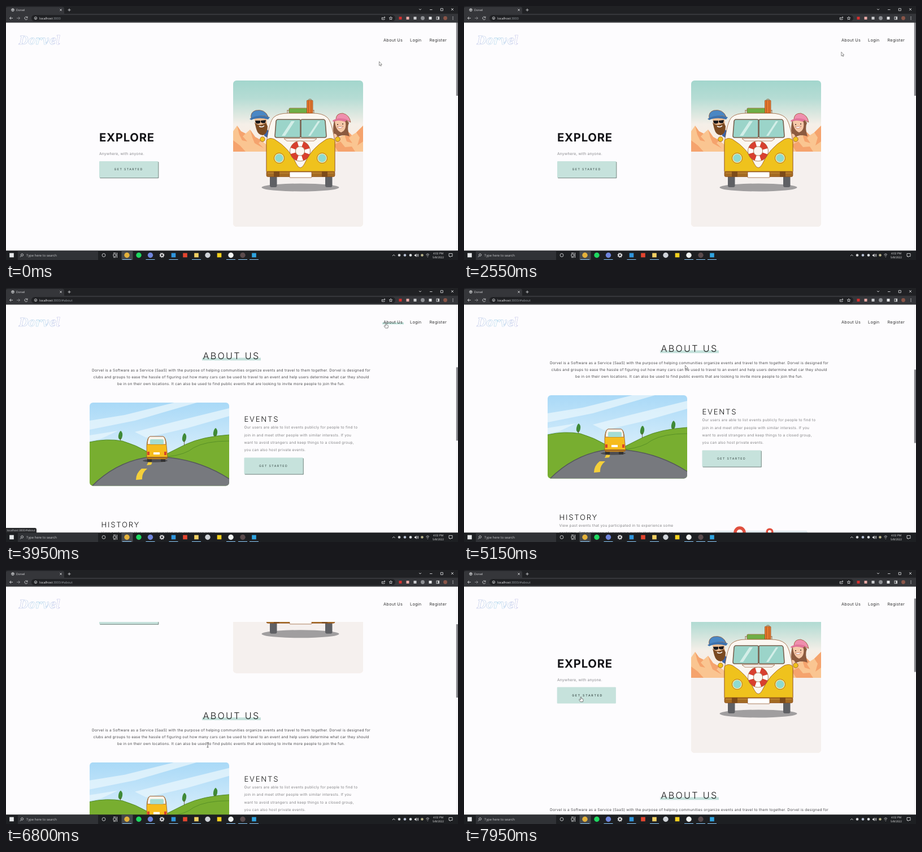
An HTML page that plays this animation: 800x450 px, repeating every 8000 ms.

```html
<!DOCTYPE html>
<html lang="en">
<head>
<meta charset="utf-8">
<title>Dorvel</title>
<style>
html, body { margin: 0; width: 100%; height: 100%; overflow: hidden; background: #fdfcfe; }
svg { display: block; width: 100%; height: 100%; text-rendering: geometricPrecision; }
text { font-family: Inter, sans-serif; white-space: pre; }
.ui text { font-family: "Open Sans", sans-serif; }
.nav { font-size: 7.3px; letter-spacing: .28px; fill: #333; }
.para { font-size: 6.5px; letter-spacing: .245px; fill: #4a4a4c; text-anchor: middle; }
.body { font-size: 6.5px; letter-spacing: .245px; fill: #858587; }
.h3 { font-size: 13.2px; font-weight: 300; letter-spacing: 1.75px; fill: #151515; }
.btn text { font-size: 5.2px; letter-spacing: 1.45px; fill: #2f3f3c; }
.btn.hover text { letter-spacing: 1.78px; font-weight: 500; }
.btn.hover .shade { display: none; }
.btn.hover { transform: translate(-.3px, -.6px); }
.line { fill: none; stroke: #d5d6d8; stroke-width: .9; }
.ink { stroke: #8b4a1c; stroke-width: .7; }
</style>
</head>
<body>
<svg viewBox="0 0 800 450">
<defs>
  <linearGradient id="dawn" x2="0" y2="1">
    <stop offset="0" stop-color="#a3d6cd"/><stop offset=".12" stop-color="#b5dcd4"/>
    <stop offset=".3" stop-color="#f5efe8"/><stop offset=".5" stop-color="#fbe9dc"/>
  </linearGradient>
  <linearGradient id="sky" x2="0" y2="1">
    <stop offset="0" stop-color="#a9d9f7"/><stop offset=".6" stop-color="#d6edfb"/>
  </linearGradient>
  <linearGradient id="logo">
    <stop offset="0" stop-color="#b9bfe6"/><stop offset=".5" stop-color="#a9d3ea"/><stop offset="1" stop-color="#c3c0e8"/>
  </linearGradient>
  <clipPath id="heroClip"><rect x="402" y="132" width="230" height="259" rx="6"/></clipPath>
  <clipPath id="roadClip"><rect width="247" height="147.5" rx="6"/></clipPath>
</defs>
<rect width="800" height="450" fill="#fdfcfe"/>

<g id="page">
  <text x="165" y="239.8" font-size="20.3" font-weight="700" letter-spacing=".75" fill="#141418">EXPLORE</text>
  <text x="165" y="264" font-size="6.7" letter-spacing=".18" fill="#8a8a8e">Anywhere, with anyone.</text>

  <g clip-path="url(#heroClip)">
    <rect x="402" y="132" width="230" height="259" fill="url(#dawn)"/>
    <path d="M402 222L409 212 416 222 424 226 432 219 441 232 452 238 466 250V260H402ZM574 246L590 232 597 229 604 221 612 229 620 224 632 212V260H574Z" fill="#fac591"/>
    <path d="M409 212L416 222 424 226 419 231 427 240 418 238 413 228ZM432 219L441 232 452 238 447 243 456 252 440 243 436 233ZM402 238L414 247 424 258H402ZM604 221L612 229 607 234 613 243 603 240 600 231ZM632 212V240L622 247 626 233 620 224ZM580 246L592 240 600 250 612 249 618 258H588Z" fill="#f5a36d"/>
    <rect x="402" y="258" width="230" height="134" fill="#f5f0ee"/>
    <ellipse cx="521" cy="321.5" rx="68.5" ry="7" fill="#a09e9f"/>
    <g fill="#5f6064"><rect x="467" y="298" width="12.5" height="23" rx="3"/><rect x="565" y="298" width="12.5" height="23" rx="3"/></g>

    <g id="man">
      <path d="M456 216L467 222V236L457 230Z" fill="#3b64a8"/>
      <path d="M439 197L461 196 462 212 456 222 443 216Z" fill="#efbd92"/>
      <path d="M440 206Q447 215 460 207L463 213Q463 226 455 229 446 229 443 218Z" fill="#7a4a22"/>
      <path d="M448 213Q453 216 457 212" fill="none" stroke="#fff" stroke-width="1.6"/>
      <path d="M441 203H450V207Q445 210 442 207ZM451 203L460 202 459 207Q454 209 451 206Z" fill="#17171a"/>
      <path d="M434 199Q432 188 442 185 458 182 464 196 453 192 434 199Z" fill="#4a87c4" class="ink"/>
      <path d="M431 200Q446 191 467 197L464 201Q447 196 434 202Z" fill="#3d72ad"/>
    </g>
    <g id="woman">
      <path d="M581 203Q598 195 607 207 603 216 608 231 595 226 584 234 576 224 581 203Z" fill="#8c5a3f"/>
      <path d="M582 204Q594 199 601 206 603 220 593 224 583 220 582 204Z" fill="#f6c9a9"/>
      <path d="M586 214Q591 220 597 213Z" fill="#fff" stroke="#b4533f" stroke-width=".6"/>
      <g fill="#33221c"><circle cx="587" cy="210" r=".9"/><circle cx="596" cy="209" r=".9"/></g>
      <path d="M584 201Q584 190 596 190 608 193 610 206 596 198 584 201Z" fill="#ef8fae" class="ink"/>
      <path d="M578 203Q588 196 604 201L600 205Q588 201 579 205Z" fill="#e2759a"/>
      <path d="M575 225L584 227 588 233 576 237Z" fill="#f6c9a9"/>
    </g>

    <g class="ink">
      <path d="M498 190V184M545 190V184M498 185H545" fill="none"/>
      <rect x="501" y="181" width="32" height="9" rx="1.5" fill="#79b84d"/>
      <path d="M501 184H533M501 187H533" fill="none" stroke="#4c8a31"/>
      <rect x="532.5" y="167" width="10.5" height="23" rx="1" fill="#e8772e"/>
      <path d="M536 167V165H540V167M535.5 168V189M540 168V189" fill="none"/>
      <path d="M461 242Q466 204 474 197 482 190 499 190H543Q560 190 568 197 577 204 582 242V292Q582 297 577 297H466Q461 297 461 292Z" fill="#fbf7f1"/>
      <path d="M461 238Q466 232 475 236 502 252 514 280 521 293 528 280 540 252 567 236 577 232 582 238V292Q582 297 577 297H466Q461 297 461 292Z" fill="#efc21d"/>
      <path d="M492 235H550L545 239H497Z" fill="#fff"/>
      <g fill="#9bd4c9" stroke="#77604e" stroke-width="1.6">
        <path d="M481 201H519Q521 201 521 203V231Q521 233 519 233H479Q476 233 476 230L478 204Q479 201 481 201Z"/>
        <path d="M524 201H562Q564 201 565 204L567 230Q567 233 564 233H524Q522 233 522 231V203Q522 201 524 201Z"/>
      </g>
      <path d="M488 230L505 204H511L494 230ZM535 230L552 204H556L539 230Z" fill="#d3eee8" stroke="none"/>
      <circle cx="454" cy="236" r="4.3" fill="#efc21d"/><circle cx="587" cy="236" r="4.3" fill="#efc21d"/>
      <g fill="#8edad0" stroke="#fbe9a0" stroke-width="1.6"><circle cx="483.5" cy="269.5" r="8"/><circle cx="559.5" cy="269.5" r="8"/></g>
      <g fill="none"><circle cx="483.5" cy="269.5" r="9"/><circle cx="559.5" cy="269.5" r="9"/></g>
    </g>
    <g fill="none">
      <circle cx="520.5" cy="257" r="13" stroke="#fff" stroke-width="9.6"/>
      <circle cx="520.5" cy="257" r="13" stroke="#d8402f" stroke-width="9.6" stroke-dasharray="12 8.42" stroke-dashoffset="-4.2"/>
      <g class="ink"><circle cx="520.5" cy="257" r="17.9"/><circle cx="520.5" cy="257" r="8.1" fill="#fbf7f1"/></g>
    </g>
    <rect x="461" y="293" width="121" height="9.5" rx="2.5" fill="#a36a22" class="ink"/>
    <path d="M463 296H580" stroke="#c98f3c" stroke-width="1.2"/>
    <rect x="474" y="293" width="10" height="9.5" fill="#7d4b19"/><rect x="559" y="293" width="10" height="9.5" fill="#7d4b19"/>
    <rect x="502" y="294" width="39" height="10" rx="1" fill="#fff" class="ink"/>
  </g>

  <rect x="347" y="469.5" width="104" height="4.8" fill="#c3e0da"/>
  <text x="348.5" y="472.3" font-size="16.2" font-weight="300" letter-spacing="2.3" fill="#151515">ABOUT US</text>
  <text class="para" x="398.5" y="494.4">Dorvel is a Software as a Service (SaaS) with the purpose of helping communities organize events and travel to them together. Dorvel is designed for</text>
  <text class="para" x="398.5" y="506.2">clubs and groups to ease the hassle of figuring out how many cars can be used to travel to an event and help users determine what car they should</text>
  <text class="para" x="398.5" y="518">be in on their own locations. It can also be used to find public events that are looking to invite more people to join the fun.</text>

  <g transform="translate(148 549)" clip-path="url(#roadClip)">
    <rect width="247" height="148" fill="url(#sky)"/>
    <path d="M0 32L62 22 118 8 150 0H190L128 18 80 32 0 48ZM80 52L150 34 247 10V24L170 46 100 62ZM0 58L50 50 20 64 0 68Z" fill="#e6f5fd" opacity=".8"/>
    <g id="trees" fill="#3f8a37"></g>
    <path d="M0 70Q30 63 58 68 82 75 104 88L138 90Q156 81 170 74 200 60 247 57V148H0Z" fill="#78ae30"/>
    <path d="M0 70Q30 63 58 68 82 75 104 88M138 90Q156 81 170 74 200 60 247 57" fill="none" stroke="#4b8423" stroke-width=".9"/>
    <path d="M138 96Q170 92 184 80 205 68 247 68" fill="none" stroke="#4b8423" stroke-width=".7"/>
    <path d="M4 148Q44 108 96 98 120 94 146 98 200 105 247 135V148Z" fill="#77797e"/>
    <path d="M4 148Q44 108 96 98 120 94 146 98 200 105 247 135" fill="none" stroke="#54575c" stroke-width="1.4"/>
    <path d="M104 105L111 105 109 110 101 111ZM92 117L102 117Q92 125 93 136L82 137Q82 125 92 117Z" fill="#f4cf3a"/>
    <ellipse cx="116" cy="103" rx="22" ry="2.8" fill="#4c4d51"/>
    <path d="M102 97H110V105H102ZM126 97H134V105H126Z" fill="#333"/>
    <path d="M101 76Q102 61 107 60H130Q135 61 136 76L138 97Q137 100 134 100H104Q101 100 101 97Z" fill="#f6bc1c" class="ink"/>
    <path d="M102 74Q103 61 107 60H130Q134 61 135 74Z" fill="#f8f5ec" class="ink"/>
    <rect x="107" y="65" width="24" height="9" rx="2" fill="#a5dcd2"/>
    <rect x="113" y="88" width="11" height="4" fill="#fff"/>
    <path d="M102 87H106V93H102ZM132 87H136V93H132Z" fill="#d6452c"/>
    <path d="M101 96H138V99H101Z" fill="#a36a22"/>
  </g>

  <text class="h3" x="421.5" y="582.8">EVENTS</text>
  <g id="events" class="body"></g>
  <text class="h3" x="168.5" y="770">HISTORY</text>
  <g id="history" class="body"></g>
  <g id="buttons"></g>
  <rect x="443" y="789" width="165" height="40" rx="3" fill="#dfe8ec"/>
  <g fill="#fff" stroke="#e0503f"><circle cx="488" cy="792" r="8" stroke-width="5.5"/><circle cx="541" cy="791" r="4.8" stroke-width="3.6"/></g>
</g>

<g id="header">
  <rect y="29" width="797" height="63" fill="#fdfcfe"/>
  <text x="23" y="68" font-size="21.3" font-weight="900" font-style="italic" style="font-family:'Noto Serif',serif" fill="#fff" stroke="url(#logo)" stroke-width=".6">Dorvel</text>
  <rect id="under" x="666" y="61" width="38" height="3.4" fill="#bfe0d9"/>
  <g class="nav"><text x="668" y="63">About Us</text><text x="715" y="63">Login</text><text x="749.5" y="63">Register</text></g>
</g>
<rect x="796.5" y="29" width="3.5" height="405" fill="#f6f5f7"/>
<rect id="thumb" x="796.8" y="29" width="3.2" height="130" fill="#85858a"/>

<g class="ui">
  <rect width="800" height="14" fill="#202124"/>
  <path d="M0 14V4Q0 1.5 4 1.5H100Q103 1.5 103 5V14Z" fill="#35363a"/>
  <rect y="13.7" width="800" height="15.8" fill="#35363a"/>
  <rect x="45" y="16" width="644" height="11" rx="5.5" fill="#202124"/>
  <circle cx="12" cy="7" r="2.4" class="line"/><path class="line" d="M10 6Q12 8 14 6M12 4.7V9"/>
  <text x="18" y="9" font-size="5" fill="#e6e6e8">Dorvel</text>
  <path class="line" d="M95.3 5.3L98.7 8.7M98.7 5.3L95.3 8.7M109.5 7H114.5M112 4.5V9.5M731 5L733 7 735 5M750 6.5H754.5M769.3 4.3H773.3V8.3H769.3ZM788 4L792 8M792 4L788 8"/>
  <path class="line" d="M12 21.5H6.5M9 19L6.5 21.5 9 24M37.6 20A2.6 2.6 0 1 0 38 22.5M38 18.6V20.6H36"/>
  <path class="line" d="M19 21.5H24.5M22 19L24.5 21.5 22 24" opacity=".55"/>
  <circle cx="52.5" cy="21.5" r="2.2" class="line"/><path class="line" d="M52.5 21V23"/>
  <text x="59" y="23.6" font-size="5.6" fill="#f1f1f3">localhost<tspan fill="#9aa0a6">:3000<tspan id="hash">/#about</tspan></tspan></text>
  <path class="line" d="M667 20.5H665.3V24H670V22.5M667 22.5Q667 20 671 20M669.5 18.5L671 20 669.5 21.5"/>
  <path class="line" d="M681 18.8L681.8 20.7 683.8 20.8 682.3 22.2 682.8 24.2 681 23.1 679.2 24.2 679.7 22.2 678.2 20.8 680.2 20.7Z"/>
  <g id="ext"></g>
  <rect x="762" y="19.2" width="4.6" height="4.6" class="line"/><rect x="764.5" y="19" width="2.4" height="5" fill="#d5d6d8"/>
  <g fill="#d5d6d8"><circle cx="791" cy="19.3" r=".7"/><circle cx="791" cy="21.5" r=".7"/><circle cx="791" cy="23.7" r=".7"/></g>

  <g id="status">
    <path d="M0 425H51Q54 425 54 428V434H0Z" fill="#292a2d"/>
    <text x="1.5" y="431" font-size="4.8" fill="#d0d2d6">localhost:3000/#about</text>
  </g>

  <rect y="433.3" width="800" height="17" fill="#1d1f22"/>
  <rect x="21" y="433.8" width="142" height="16.5" fill="#303236"/>
  <circle cx="28.5" cy="441" r="2" class="line"/><path class="line" d="M27 442.6L25 444.8"/>
  <text x="36" y="444" font-size="5.9" fill="#c4c5c8">Type here to search</text>
  <circle cx="173" cy="441.5" r="2.9" class="line" stroke-width="1.1"/>
  <path class="line" d="M190 439.5H194.5V443.5H190ZM190 437.5H194.5M190 445.5H194.5M196.5 437V446"/>
  <rect x="204.5" y="433.3" width="20" height="17" fill="#45484c"/>
  <g fill="none" stroke="#e4e4e6"><circle cx="276" cy="441.5" r="2.5" stroke-width="1.7"/><circle cx="276" cy="441.5" r="3.8" stroke-width="1.2" stroke-dasharray="1.5 1.48"/></g>
  <g id="bar"></g>
  <path class="line" d="M684 443L686.3 440.5 688.6 443M743.5 440.5Q746.5 437.5 749 440.5M744.5 442.5Q746.5 440.5 748 442.5M746.3 444V445"/>
  <path d="M723 440.5H724.5L726.5 438.5V445L724.5 443H723Z" fill="#d5d6d8"/>
  <path class="line" d="M727.8 440Q729 441.7 727.8 443.4M729 439Q731 441.7 729 444.4"/>
  <g font-size="4.8" fill="#eee" text-anchor="middle"><text x="765" y="439.6">4:02 PM</text><text x="765" y="447">5/8/2022</text></g>
  <path d="M784 438.5H790V443.5H787.5L786 445V443.5H784Z" class="line"/>
</g>

<g id="cursor" stroke-linejoin="round">
  <path id="arrow" d="M0 0V7L1.6 5.6 2.7 8 3.8 7.5 2.8 5.2H4.9Z" fill="#fff" stroke="#444" stroke-width=".6"/>
  <path id="hand" d="M-.8 .6Q0-.5 .8 .6V3.4L3.4 4Q4.2 4.4 4 5.4L3.4 9H-1L-3.2 5.8Q-3.4 4.4 -2.2 4.6L-.8 5.8Z" fill="#fff" stroke="#333" stroke-width=".6"/>
  <path id="beam" d="M-1.6-4H1.6M-1.6 4H1.6M0-4V4" fill="none" stroke="#333" stroke-width=".7"/>
</g>
</svg>
<script>
const $ = id => document.getElementById(id);
const show = (id, on) => $(id).style.display = on ? "" : "none";
const fill = (id, items, fn) => $(id).innerHTML = items.map(fn).join("");

fill("buttons", [["explore", 165, 275], ["join", 421.5, 646.5]], ([id, x, y]) =>
  `<g transform="translate(${x} ${y})"><g class="btn" id="${id}">
   <rect class="shade" x="1" y="1" width="104.4" height="29.2" rx="1" fill="#869692"/>
   <rect width="104.2" height="29" rx="1" fill="#c6e2dc"/>
   <text x="26.5" y="16.4">GET STARTED</text></g></g>`);

const lines = (id, x, y, rows) => fill(id, rows, (s, i) => `<text x="${x}" y="${y + i * 13.3}">${s}</text>`);
lines("events", 421.5, 595.4, [
  "Our users are able to list events publicly for people to find to",
  "join in and meet other people with similar interests. If you",
  "want to avoid strangers and keep things to a closed group,",
  "you can also host private events."]);
lines("history", 168.5, 782, [
  "View past events that you participated in to experience some",
  "nostalgia. Get a glimpse of upcoming events that you plan on",
  "attending with your group."]);

fill("trees", [[55, 50], [168, 54], [223, 45]], ([x, y]) =>
  `<path d="M${x} ${y}q4 3 3 9q-1 6-4 7q-4-2-3-8q1-6 4-8z"/><path d="M${x - .5} ${y + 12}v10" stroke="#6b4a2a" stroke-width=".8"/>`);

const mark = (x, y, r, color, square) => square
  ? `<rect x="${x - r}" y="${y - r}" width="${2 * r}" height="${2 * r}" fill="${color}"/>`
  : `<circle cx="${x}" cy="${y}" r="${r}" fill="${color}"/>`;

fill("ext", [["#d32f2f", 698, 1], ["#e8a9a5", 711, 1], ["#c9cacd", 724, 1], ["#8f9195", 737.5], ["#e3e4e6", 751, 1], ["#8a5548", 777.5]],
  ([c, x, sq]) => mark(x, 21.5, sq ? 2.5 : 3.4, c, sq));

const apps = [["#e6e8ea", 10, 1], ["#e3b13b", 214], ["#1ed760", 235], ["#6f85dc", 255.5],
  ["#2f95dc", 296.5, 1], ["#e2452f", 317, 1], ["#f2cf63", 337, 1], ["#cfd3d8", 357], ["#f7d21e", 377.5, 1],
  ["#f1f4f2", 398], ["#5a4a4c", 419], ["#2fa4e0", 439, 1]];
const open = [214, 255.5, 296.5, 337, 398, 419, 439];
fill("bar", apps, ([c, x, sq]) => mark(x, 441.5, sq ? 3.8 : 4.7, c, sq) +
  (open.includes(x) ? `<rect x="${x - 8}" y="448.8" width="16" height="1.2" fill="#7fb6e0"/>` : ""));
$("bar").innerHTML += ["#d5d6d8", "#b9c3d6", "#dfe6ea", "#b9b48a"]
  .map((c, i) => mark([696, 706, 716, 736.5][i], 441.5, 2.3, c)).join("");

// rows: time, then values
const scrollKeys = [[3525, 0], [4005, 359], [6400, 359], [7183, 67]];
const mouseKeys = [[0, 660.5, 98.5], [250, 660, 99.5], [650, 660, 99.5], [1450, 647.5, 115], [1850, 652, 108],
  [2000, 652, 108], [2700, 670, 78], [2850, 672, 68], [3250, 680, 60.5], [3600, 680, 60.5], [3950, 672.5, 62],
  [4150, 668, 68], [5150, 391.5, 137], [5250, 391, 138], [6050, 372, 240], [6800, 357, 310], [7000, 352, 308], [7700, 207, 224.5]];

function at(keys, t) {
  const i = keys.findIndex(k => k[0] > t);
  if (i === 0) return keys[0].slice(1);
  if (i < 0) return keys[keys.length - 1].slice(1);
  const a = keys[i - 1], b = keys[i], u = (t - a[0]) / (b[0] - a[0]), e = u * u * (3 - 2 * u);
  return a.slice(1).map((v, n) => v + (b[n + 1] - v) * e);
}

const start = performance.now();
function draw() {
  const t = Math.floor((performance.now() - start) % 8000 / 50) * 50;
  const [scroll] = at(scrollKeys, t), [x, y] = at(mouseKeys, t);
  $("page").setAttribute("transform", `translate(0 ${-scroll})`);
  $("thumb").setAttribute("y", 29 + scroll * .322);
  $("cursor").setAttribute("transform", `translate(${x} ${y})`);

  const link = t >= 2850 && t < 4200, press = t >= 7650;
  const beam = t >= 6500 && t < 7050;
  show("under", link);
  show("status", t >= 2900 && t < 4500);
  show("hash", t >= 3500);
  show("hand", link || press);
  show("beam", beam);
  show("arrow", !link && !press && !beam);
  $("explore").classList.toggle("hover", press);
  requestAnimationFrame(draw);
}
draw();
</script>
</body>
</html>
```
